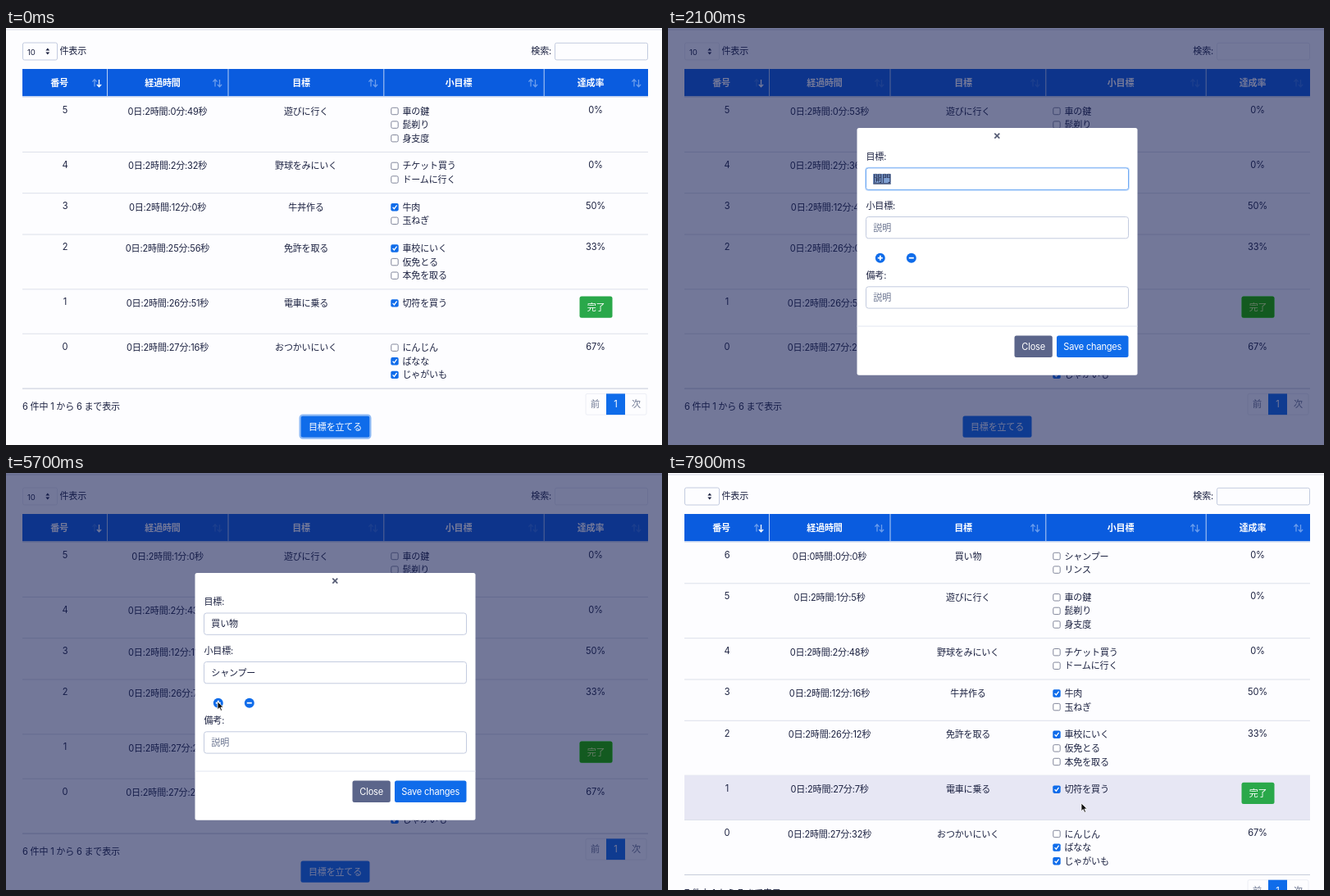
These frames come from a looping animation (800 by 509 pixels, 8 s). An HTML page:

```html
<!DOCTYPE html>
<html lang="ja">
<head>
<meta charset="utf-8">
<style>
html, body { margin: 0; width: 100%; height: 100%; overflow: hidden; background: #fdfdff; }
svg { display: block; width: 800px; height: 509px; font: 11.05px Inter, "Noto Sans CJK JP", "Noto Sans CJK", sans-serif; letter-spacing: -.2px; }
</style>
</head>
<body>
<svg id="stage" viewBox="0 0 800 509"></svg>
<script>
const LOOP = 8000, STEP = 100, LINE = 16.6;
const INK = '#1b2140', BLUE = '#0f6cea', GRAY = '#6b7590', EDGE = '#c3cbdf', GREEN = '#2aa84a';
const ADD_ROW = 7800, GROW = 5800, OPEN = 476, CLOSE = 7477;

const clamp = v => Math.max(0, Math.min(1, v));
const easeOut = v => 1 - (1 - clamp(v)) ** 1.8;

const rect = (x, y, w, h, fill, extra = '') =>
  `<rect x="${x}" y="${y}" width="${w}" height="${h}" fill="${fill}" ${extra}/>`;
const line = (x1, y1, x2, y2, color, width = 1) =>
  `<path d="M${x1} ${y1}L${x2} ${y2}" stroke="${color}" stroke-width="${width}"/>`;
// y is the optical middle of the text
const text = (x, y, s, fill = INK, anchor = 'start', extra = '') =>
  `<text x="${x}" y="${y + 4}" fill="${fill}" text-anchor="${anchor}" ${extra}>${s}</text>`;
const mid = (x, y, s, fill, extra) => text(x, y, s, fill, 'middle', extra);
const button = (x, y, w, label, fill) =>
  rect(x, y, w, 26.3, fill, 'rx="2.5"') + mid(x + w / 2, y + 13.2, label, '#fff');

// [number, seconds at start, goal, small goals (* = done), rate]
const rows = [
  [5, 7249, '遊びに行く', ['車の鍵', '髭剃り', '身支度'], '0%'],
  [4, 7352, '野球をみにいく', ['チケット買う', 'ドームに行く'], '0%'],
  [3, 7920, '牛丼作る', ['*牛肉', '玉ねぎ'], '50%'],
  [2, 8756, '免許を取る', ['*車校にいく', '仮免とる', '本免を取る'], '33%'],
  [1, 8811, '電車に乗る', ['*切符を買う'], ''],
  [0, 8836, 'おつかいにいく', ['にんじん', '*ばなな', '*じゃがいも'], '67%']
];
const newRow = [6, -16, '買い物', ['シャンプー', 'リンス'], '0%'];

// [time, content, composing highlight]
const goalKeys = [[0, '', ''], [1700, 'か', 'none'], [1800, 'かい', 'none'], [2000, '開門', '#7f9fd0'],
  [2200, 'かいもの', 'none'], [2500, '買い物', '#a9cdfb'], [2900, '買い物', '']];
const firstKeys = [[0, '', ''], [3900, 'し', 'none'], [4100, 'しゃ', 'none'], [4400, 'しゃん', 'none'],
  [4600, 'しゃんぷ', 'none'], [4700, 'しゃんぷー', 'none'], [5000, 'シャンプー', '#a9cdfb'], [5300, 'シャンプー', '']];
const secondKeys = [[0, '', ''], [6200, 'り', 'none'], [6400, 'りん', 'none'], [6500, 'りんす', 'none'],
  [6600, 'リンス', '#a9cdfb'], [6900, 'リンス', '']];

const path = [[0, 403, 487], [700, 403, 487], [1200, 380, 184], [5400, 340, 250], [5700, 258, 279],
  [5900, 258, 279], [6000, 300, 262], [6900, 400, 300], [7300, 504, 403], [8000, 504, 403]];
const shown = [[100, 1600], [5400, 6200], [6900, 8000]];

function cursorAt(t) {
  if (!shown.some(([a, b]) => t >= a && t < b)) return null;
  const i = path.findIndex(p => p[0] > t), [a, x, y] = path[i - 1], [b, u, v] = path[i];
  let k = (t - a) / (b - a);
  k = k * k * (3 - 2 * k);
  return { x: x + (u - x) * k, y: y + (v - y) * k };
}

function drawCursor(c, hand) {
  const d = hand
    ? 'M0 1.2q0-1.2 1-1.2t1 1.2v3.4l4.6 1q1 .4.8 1.5l-.7 3.4H1.4L-1.8 7.2q-.3-1.2.8-1l1 .8z'
    : 'M0 0v9.8l2.3-2.2 1.6 3.7 1.7-.7-1.6-3.6h3.2z';
  return `<path transform="translate(${c.x} ${c.y})" d="${d}" fill="${hand ? '#fff' : '#111'}" stroke="${hand ? '#111' : '#fff'}" stroke-width=".8"/>`;
}

function elapsed(start, t) {
  const s = start + Math.floor(t / 500 + .4);
  return `0日:${Math.floor(s / 3600)}時間:${Math.floor(s / 60) % 60}分:${s % 60}秒`;
}

function checkbox(y, on) {
  return on
    ? rect(469.3, y - 4.7, 9.4, 9.4, BLUE, 'rx="1.8"') +
      `<path d="M471.6 ${y}l1.8 2 3.2-4.4" fill="none" stroke="#fff" stroke-width="1.3"/>`
    : rect(469.8, y - 4.2, 8.4, 8.4, '#fff', 'rx="1.6" stroke="#747a90" stroke-width=".9"');
}

const sortArrow = (x, up, alpha) =>
  `<path d="M${x} 63v8.5M${x - 2.6} ${up ? 65.6 : 69}l2.6 ${up ? -2.8 : 2.8} 2.6 ${up ? 2.8 : -2.8}" fill="none" stroke="#fff" stroke-width="1.3" opacity="${alpha}"/>`;

function header(dim) {
  const faint = .4 - .25 * dim;
  let s = rect(20, 50, 763, 33.3, '#0a5cdf') + line(20, 84.2, 783, 84.2, '#d3daec');
  for (const x of [123.5, 271, 460.8, 656.2]) s += line(x, 50, x, 83.3, '#b9cff4');
  [['番号', 65, 111], ['経過時間', 191, 258], ['目標', 360, 448], ['小目標', 552, 643], ['達成率', 713, 769]]
    .forEach(([label, x, icon], i) => {
      s += mid(x, 67, label, '#fff', 'font-weight="700"') +
        sortArrow(icon - 3, true, faint) + sortArrow(icon + 2.5, false, i ? faint : 1);
    });
  return s;
}

function toolbar(t, dim) {
  const border = `rx="2" stroke="${EDGE}" stroke-opacity="${1 - .7 * dim}"`;
  return line(0, 2, 800, 2, '#e3e4ec', 1.5) +
    rect(20.5, 18, 42, 21, '#fdfdff', border) +
    (t < ADD_ROW ? text(26, 28.5, '10', INK, 'start', 'font-size="9.6"') : '') +
    `<path d="M48.4 27.6l2.4-3 2.4 3zM48.4 29.6l2.4 3 2.4-3z" fill="${INK}"/>` +
    text(65.5, 28, '件表示') + text(665, 28, '検索:', INK, 'end') +
    rect(669.5, 18.3, 113, 20.6, '#fdfdff', border);
}

function footer(y, count, ring) {
  const top = y + 6.3, by = y + 33.3;
  return text(20, y + 22.3, `${count} 件中 1 から ${count} まで表示`) +
    rect(707, top, 74, 25.7, '#fdfdff', 'stroke="#eceef5" rx="2"') +
    rect(732, top, 23, 25.7, BLUE) +
    mid(718.5, top + 13, '前', GRAY) + mid(743.5, top + 13, '1', '#fff') + mid(768.5, top + 13, '次', GRAY) +
    (ring ? rect(358.5, by - 1, 86, 28.3, 'none', 'rx="3.5" stroke="#8db9f5" stroke-width="2"') : '') +
    button(359.5, by, 84, '目標を立てる', BLUE);
}

function page(t, dim, cursor) {
  const list = t < ADD_ROW ? rows : [newRow, ...rows];
  let y = 84.5, s = '', doneY;
  for (const [no, start, goal, items, rate] of list) {
    const h = rate ? items.length * LINE + 17.1 : 54.3, cy = y + 17;
    if (cursor && !dim && cursor.y > y && cursor.y < y + h) s += rect(20, y, 763, h, '#e7e7f4');
    s += mid(72, y + 15.4, no) + mid(197, cy, elapsed(start, t)) + mid(366, cy, goal);
    items.forEach((item, i) => {
      const iy = cy + i * LINE, on = item[0] === '*';
      s += checkbox(iy, on) + text(483.5, iy, on ? item.slice(1) : item);
    });
    if (rate) s += mid(719, y + 15.4, rate);
    else doneY = y + 8.5;
    y += h;
    s += line(20, y, 783, y, no ? '#dce0ea' : '#c4cad8');
  }
  return toolbar(t, dim) + header(dim) + s + footer(y, list.length, t < 600) +
    rect(0, 0, 800, 509, '#111950', `opacity="${.58 * dim}"`) +
    button(699.5, doneY, 40, '完了', GREEN) +
    rect(699.5, doneY, 40, 26.3, '#052a08', `rx="2.5" opacity="${.62 * dim}"`);
}

function field(y, keys, hint, t, focus) {
  const [, value, mark] = keys.filter(k => k[0] <= t).pop();
  const w = value.length * 10.85;
  return (focus ? rect(240.2, y - 1.3, 322.6, 29, '#bcd8fb', 'rx="4"') : '') +
    rect(241.5, y, 320, 26.3, 'none', `rx="3" stroke="${focus ? '#70aaf3' : EDGE}"`) +
    (focus ? rect(242, y + .5, 319, 25.3, '#fff', 'rx="2.5"') : '') +
    (mark ? rect(250, y + 7, w, 12.5, mark) + line(250.5, y + 19, 250 + w, y + 19, INK) : '') +
    text(250.3, y + 13, value || hint, value ? INK : GRAY) +
    (focus && (!mark || mark === 'none') ? line(251 + w, y + 7, 251 + w, y + 19.5, INK, .8) : '');
}

function icon(x, y, plus) {
  return `<circle cx="${x}" cy="${y}" r="6" fill="${BLUE}"/>` + line(x - 3, y, x + 3, y, '#fff', 1.8) +
    (plus ? line(x, y - 3, x, y + 3, '#fff', 1.8) : '');
}

function modal(t) {
  if (t < OPEN || t > CLOSE + 75) return '';
  const closing = t > CLOSE, from = closing ? CLOSE : OPEN;
  const fade = clamp((t - from) / 75), slide = easeOut((t - from) / 150);
  const alpha = closing ? 1 - fade : fade;
  const grow = t >= GROW ? 37.2 : 0;
  const shift = -34.5 * (closing ? slide : 1 - slide) - grow / 2;
  const none = [[0, '', '']];
  return `<g transform="translate(0 ${shift})" opacity="${alpha}">` +
    rect(230.5, 122, 342, 301.7 + grow, alpha < 1 ? '#e2edff' : '#fff', 'rx="2.5"') +
    `<path d="M398.3 128.6l6 6m0-6l-6 6" stroke="#5a6078" stroke-width="1.8"/>` +
    text(241.5, 157.3, '目標:') + field(171, goalKeys, '小さな目標', t, t >= 1400 && t < 3500) +
    text(241.5, 216.5, '小目標:') + field(230.5, firstKeys, '説明', t, t >= 3500 && t < 5700) +
    (grow ? field(267.5, secondKeys, '説明', t, t >= 6000 && t < 7400) : '') +
    `<g transform="translate(0 ${grow})">` +
    icon(258.8, 280.7, true) + icon(296.8, 280.7, false) +
    text(241.5, 302, '備考:') + field(315.8, none, '説明', t, false) +
    line(230.5, 364, 572.5, 364, '#e2e6f0') +
    button(422.5, 375.6, 46.3, 'Close', '#5b658a') +
    button(474, 375.6, 87.5, 'Save changes', t >= 7300 ? '#0b5cd6' : BLUE) +
    '</g></g>';
}

const stage = document.getElementById('stage');
let last = -1;

function tick(now) {
  const t = Math.floor(now % LOOP / STEP) * STEP;
  if (t !== last) {
    last = t;
    const dim = clamp((t - 392) / 75) * (1 - clamp((t - 7629) / 75));
    const cursor = cursorAt(t);
    stage.innerHTML = rect(0, 0, 800, 509, '#fdfdff') + page(t, dim, cursor) + modal(t) +
      (cursor ? drawCursor(cursor, t >= 7300 && t <= CLOSE + 75) : '');
  }
  requestAnimationFrame(() => tick(performance.now()));
}
tick(performance.now());
</script>
</body>
</html>
```
